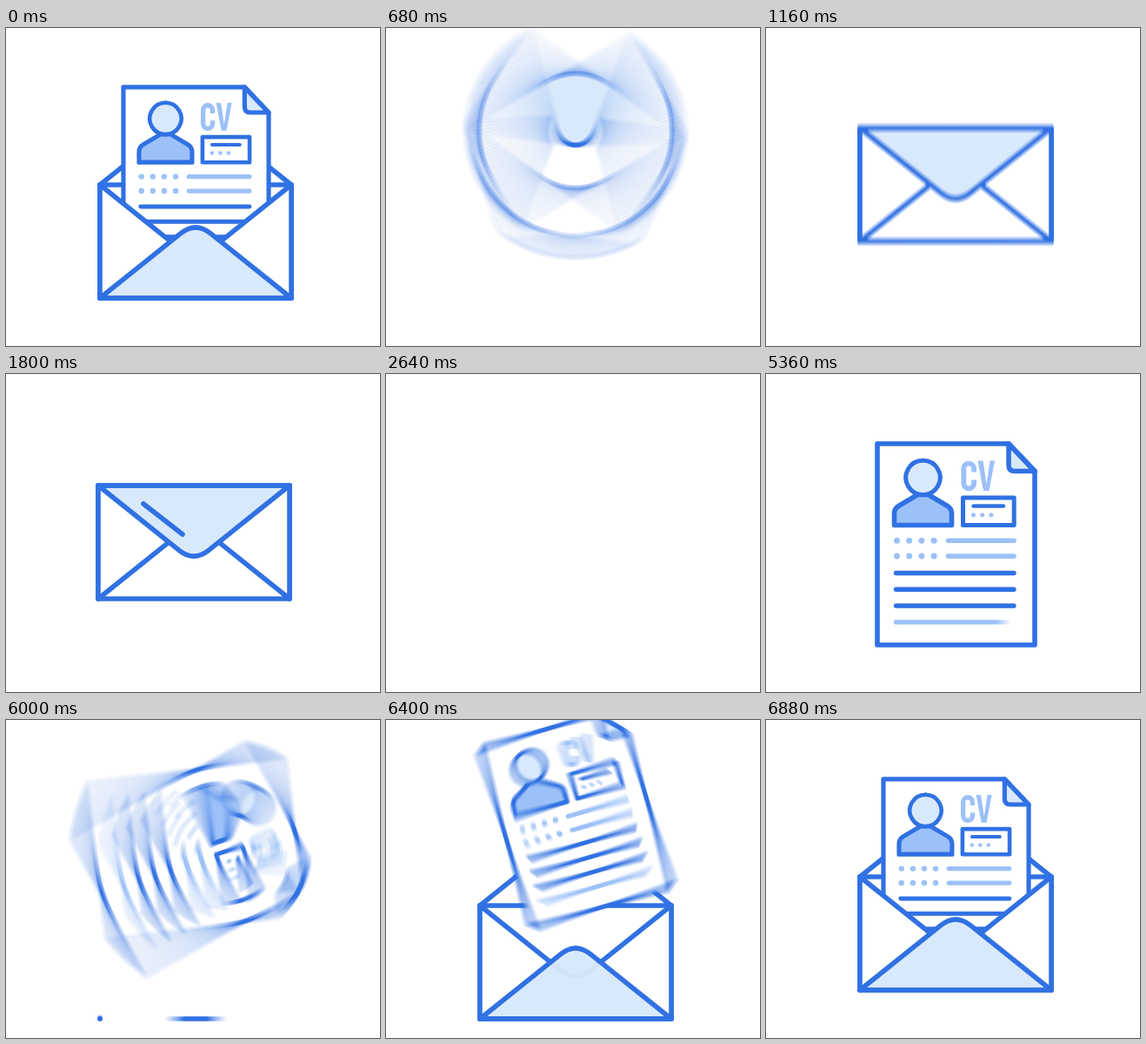
Recreate the animation shown at these times as an HTML page with a canvas. Size 430x365 px, loop 7000 ms.

```html
<!DOCTYPE html>
<html lang="en">
<head>
<meta charset="utf-8">
<title>CV by mail</title>
<style>
html, body { margin: 0; width: 100%; height: 100%; overflow: hidden; background: #fff; }
canvas { display: block; }
</style>
</head>
<body>
<canvas id="stage" width="430" height="365"></canvas>
<script>
const W = 430, H = 365, LOOP = 7000, STEP = 40, DEPTH = 5;
const DARK = '#3071e3', MID = '#9cc1f8', PALE = '#d9e9fc', WHITE = '#fff';

const layer = () => {
  const c = document.createElement('canvas');
  c.width = W;
  c.height = H;
  return c.getContext('2d');
};
const stage = document.getElementById('stage').getContext('2d');
const layers = Array.from({ length: DEPTH + 1 }, layer);
let g;

// Timing helpers
const mix = (a, b, p) => a + (b - a) * p;
const ease = (t, a, b, n = 3) => {
  const p = Math.min(1, Math.max(0, (t - a) / (b - a)));
  return p < .5 ? (2 * p) ** n / 2 : 1 - (2 - 2 * p) ** n / 2;
};
const track = (t, keys) => {
  let v = keys[0][1];
  for (let i = 1; i < keys.length; i++) {
    if (t > keys[i - 1][0]) v = mix(keys[i - 1][1], keys[i][1], ease(t, keys[i - 1][0], keys[i][0]));
  }
  return v;
};

// Drawing helpers
const fill = (path, color, alpha = 1) => {
  if (alpha <= 0) return;
  g.globalAlpha = alpha;
  g.fillStyle = color;
  g.fill(path);
  g.globalAlpha = 1;
};
const trim = (path, len, p, color = DARK, width = 5.6) => {
  if (p <= 0) return;
  g.setLineDash(p < 1 ? [Math.max(.01, len * p), len * 2] : []);
  g.strokeStyle = color;
  g.lineWidth = width;
  g.stroke(path);
  g.setLineDash([]);
};
const line = (x1, y1, x2, y2, p, color, width) =>
  trim(new Path2D(`M${x1} ${y1}L${x2} ${y2}`), Math.hypot(x2 - x1, y2 - y1), p, color, width);
const dot = (x, y, r, color) => {
  if (r <= 0) return;
  const c = new Path2D();
  c.arc(x, y, r, 0, 7);
  fill(c, color);
};
const place = (x, y, turn, scale, draw) => {
  g.save();
  g.translate(x, y);
  g.rotate(turn * Math.PI / 180);
  g.scale(scale, scale);
  draw();
  g.restore();
};

// Envelope, centred on its body
const body = new Path2D('M-110 65V-65H110V65');
const pouch = new Path2D('M-110 65L-17 -9.4Q0 -23 17 -9.4L110 65Z');
const sides = new Path2D('M-110 -65L-17 9.4Q0 23 17 9.4L110 -65');
const panel = new Path2D('M-110 -65L-17 9.4Q0 23 17 9.4L110 -65V65H-110Z');
const flap = new Path2D('M-110 0L-17 -74.4Q0 -88 17 -74.4L110 0');
const shine = { x1: 58, y1: 44, x2: 13, y2: 9 };

function envelope(s, inner) {
  if (s.flap > 0) {
    g.save();
    g.translate(0, -65);
    g.scale(1, s.flap);
    fill(flap, WHITE, s.fill);
    trim(flap, 276, s.lines);
    g.restore();
  }
  trim(body, 480, s.body);
  inner();
  fill(panel, WHITE, s.fill);
  trim(sides, 276, s.lines);
  fill(pouch, PALE, s.fill);
  trim(pouch, 496, s.lines);
  if (s.body > 0) {
    line(-110, 65, -110, mix(65, -65, Math.min(1, s.body * 480 / 130)), 1);
    line(110, 65, 110, -65, s.body >= 1 ? 1 : 0);
  }
  const half = 110 * s.base;
  if (half > 0) line(-half, 65, half, 65, 1);
  line(shine.x1, shine.y1, shine.x2, shine.y2, s.shine || 0);
}

// Document, centred on its sheet
const sheet = new Path2D('M60.5 -115.5L90.5 -84V115.5H-90.5V-115.5Z');
const fold = new Path2D('M60.5 -115.5V-91Q60.5 -84 67.5 -84H90.5Z');
const head = new Path2D('M-38 -96.2A19.7 19.7 0 1 1 -38.01 -96.2');
const bust = new Path2D('M-38 -57H-44L-66 -44Q-71 -41 -71 -35V-22H-5V-35Q-5 -41 -10 -44L-32 -57Z');
const card = new Path2D('M8 -53.5H66.7V-22H8Z');
const letterC = new Path2D('M20.6 -83V-87A5.9 5.9 0 0 0 8.8 -87V-70A5.9 5.9 0 0 0 20.6 -70V-74');
const letterV = new Path2D('M25 -96H31L35 -69L39 -96H44.5L38 -61.5H31.5Z');

function lettering(t) {
  const shift = 13 * (1 - ease(t, 4150, 4420));
  g.save();
  g.translate(shift, 0);
  g.lineCap = 'butt';
  g.globalAlpha = ease(t, 4120, 4260, 2);
  trim(letterC, 74, 1, MID, 5.8);
  g.restore();
  g.save();
  g.translate(shift, 0);
  fill(letterV, MID, ease(t, 4230, 4420, 2));
  g.restore();
}

function sheetOf(t) {
  const tint = ease(t, 4500, 4900, 2);
  fill(sheet, WHITE);
  fill(fold, PALE, tint);
  trim(sheet, 800, 1);
  trim(fold, 110, 1);
  fill(bust, MID, tint);
  trim(bust, 190, ease(t, 4260, 4600, 2));
  fill(head, tint > 0 ? PALE : WHITE, tint);
  trim(head, 123.8, ease(t, 3970, 4350, 2), DARK, 5);
  lettering(t);
  trim(card, 181, ease(t, 4350, 4700, 2), DARK, 5);
  line(20, -43.9, 54.5, -43.9, ease(t, 4550, 4800), DARK, 4.4);
  for (let i = 0; i < 3; i++) {
    dot(20 + i * 10.2, -33.6, 2.5 * ease(t, 4600 + i * 60, 4760 + i * 60), MID);
  }
  for (let row = 0; row < 2; row++) {
    const y = -4.2 + row * 17.8, start = 4600 + row * 120;
    for (let i = 0; i < 4; i++) {
      dot(-68 + i * 14.2, y, 3.5 * ease(t, start + i * 60, start + 160 + i * 60), MID);
    }
    line(-9, y, 66.5, y, ease(t, start + 200, start + 520), MID, 5.6);
  }
  for (let i = 0; i < 4; i++) {
    const y = 33 + i * 18.8, start = 4820 + i * 100;
    line(-69, y, 66.5, y, ease(t, start, start + 340), i < 3 ? DARK : MID, 5.4);
  }
}

// The sheet drops in, the envelope spins shut and shoots off
function send(t) {
  const x = 218 + track(t, [[1500, 0], [1640, 5], [1800, -2], [2190, -106], [2650, 330]]);
  const y = track(t, [[40, 245], [340, 254], [660, 118], [720, 118], [1400, 193]]);
  const drop = 190 * ease(t, 30, 500);
  const state = {
    flap: 1 - ease(t, 740, 960),
    fill: 1, lines: 1, body: 1, base: 1,
    shine: ease(t, 1490, 1740)
  };
  place(x, y, 540 * ease(t, 255, 1195, 4), 1, () => envelope(state, () => {
    if (drop >= 190) return;
    g.save();
    g.beginPath();
    g.rect(-108, -320, 216, 384);
    g.clip();
    place(.5, -70.5 + drop, 0, .923, () => sheetOf(LOOP));
    g.restore();
  }));
}

// The sheet rises, fills up, spins and meets a new envelope
function write(t) {
  const y = t < 4260
    ? mix(485, 195.5, ease(t, 3320, 4260))
    : track(t, [[4260, 195.5], [4780, 191.5], [5440, 195.5], [5640, 195.5], [6360, 112], [6440, 112], [6860, 174.5]]);
  const turn = 360 * ease(t, 5640, 6620);
  const scale = mix(1, .923, ease(t, 6020, 6500));
  const state = {
    flap: 1,
    fill: ease(t, 6220, 6420, 2),
    lines: ease(t, 6120, 6420),
    body: ease(t, 5980, 6340),
    base: ease(t, 5930, 6160, 2)
  };
  g.save();
  g.translate(218, mix(278, 245, ease(t, 6440, 6860)));
  envelope(state, () => {
    g.save();
    g.setTransform(1, 0, 0, 1, 0, 0);
    place(218.5, y, turn, scale, () => sheetOf(t));
    g.restore();
  });
  g.restore();
}

function paint(ctx, t) {
  g = ctx;
  g.fillStyle = WHITE;
  g.fillRect(0, 0, W, H);
  g.lineCap = g.lineJoin = 'round';
  if (t < 2650) send(t);
  else if (t > 3320) write(t);
}

// Motion blur: average both halves of the shutter, recursively
function expose(ctx, t, span, depth) {
  if (!depth) return paint(ctx, t);
  const other = layers[depth];
  expose(ctx, t - span / 4, span / 2, depth - 1);
  expose(other, t + span / 4, span / 2, depth - 1);
  ctx.globalAlpha = .5;
  ctx.drawImage(other.canvas, 0, 0);
  ctx.globalAlpha = 1;
}

const begin = performance.now();
let shown = -1;
function tick() {
  const t = Math.floor((performance.now() - begin) % LOOP / STEP) * STEP;
  if (t !== shown) {
    shown = t;
    expose(stage, t, STEP, DEPTH);
  }
  requestAnimationFrame(tick);
}
expose(stage, 0, STEP, DEPTH);
requestAnimationFrame(tick);
</script>
</body>
</html>
```
